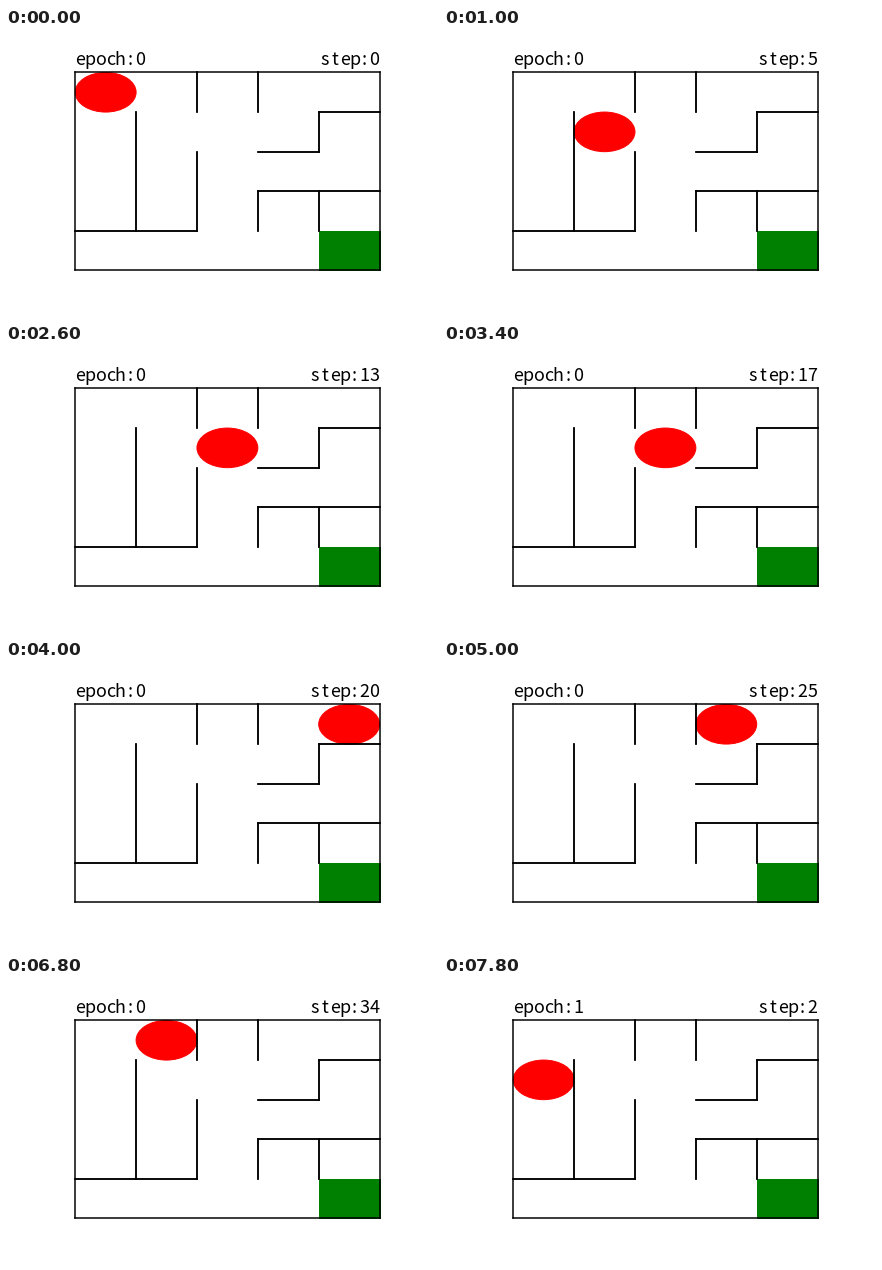
Write a matplotlib script that moves like this. It is 432 px wide and 288 px high and loops after 8 s.

```python
import matplotlib.pyplot as plt
from matplotlib.animation import FuncAnimation
from matplotlib.patches import Circle, Rectangle

W, H, DPI = 432, 288, 72
N = 5
STEP_MS = 200
PITCH = 10        # width of one character cell, px
BASELINE = 37     # px from the top

# inner walls as x0, y0, x1, y1 in grid units, y pointing down
WALLS = [
    (2, 0, 2, 1), (3, 0, 3, 1), (1, 1, 1, 4), (2, 2, 2, 4),
    (0, 4, 2, 4), (3, 2, 4, 2), (4, 1, 4, 2), (4, 1, 5, 1),
    (3, 3, 5, 3), (3, 3, 3, 4), (4, 3, 4, 4),
]
BORDER = [(0, 0, N, 0), (N, 0, N, N), (0, N, N, N), (0, 0, 0, N)]

# one move per step; "." is a bump into a wall
EPOCHS = ["..R.DU.L..RDRU..DRUR....L.D.LDULU...", ".D"]
MOVES = {"L": (-1, 0), "R": (1, 0), "U": (0, -1), "D": (0, 1), ".": (0, 0)}


def walk():
    """All states as (epoch, step, column, row)."""
    states = []
    for epoch, moves in enumerate(EPOCHS):
        x = y = 0
        states.append((epoch, 0, x, y))
        for step, move in enumerate(moves, 1):
            dx, dy = MOVES[move]
            x, y = x + dx, y + dy
            states.append((epoch, step, x, y))
    return states


STATES = walk()

fig = plt.figure(figsize=(W / DPI, H / DPI), dpi=DPI, facecolor="white")
ax = fig.add_axes([0.125, 0.11, 0.775, 0.77])
ax.set_xlim(-0.25, N + 0.25)
ax.set_ylim(N + 0.35, -0.25)
ax.axis("off")

ax.add_patch(Rectangle((N - 1, N - 1), 1, 1, color="green", lw=1))
ball = ax.add_patch(Circle((0.5, 0.5), 0.5, color="red", lw=1))

# inner walls belong to two cells, so they are stroked twice
for x0, y0, x1, y1 in BORDER + WALLS * 2:
    ax.plot([x0, x1], [y0, y1], color="black", lw=1.5)


def label(left, size):
    """A row of fixed-pitch character slots."""
    return [
        fig.text((left + (i + 0.5) * PITCH) / W, 1 - BASELINE / H, "",
                 family="Noto Sans CJK JP", fontsize=18, color="black",
                 ha="center", va="baseline")
        for i in range(size)
    ]


def write(slots, text):
    for slot, char in zip(slots, text.rjust(len(slots))):
        slot.set_text(char.strip())


epoch_label = label(69.2, 7)
step_label = label(303.6, 7)


def update(i):
    epoch, step, x, y = STATES[i]
    ball.center = (x + 0.5, y + 0.5)
    write(epoch_label, f"epoch:{epoch}")
    write(step_label, f"step:{step}")
    return [ball, *epoch_label, *step_label]


anim = FuncAnimation(fig, update, frames=len(STATES), interval=STEP_MS,
                     repeat=True, repeat_delay=0, blit=False)
plt.show()
```
